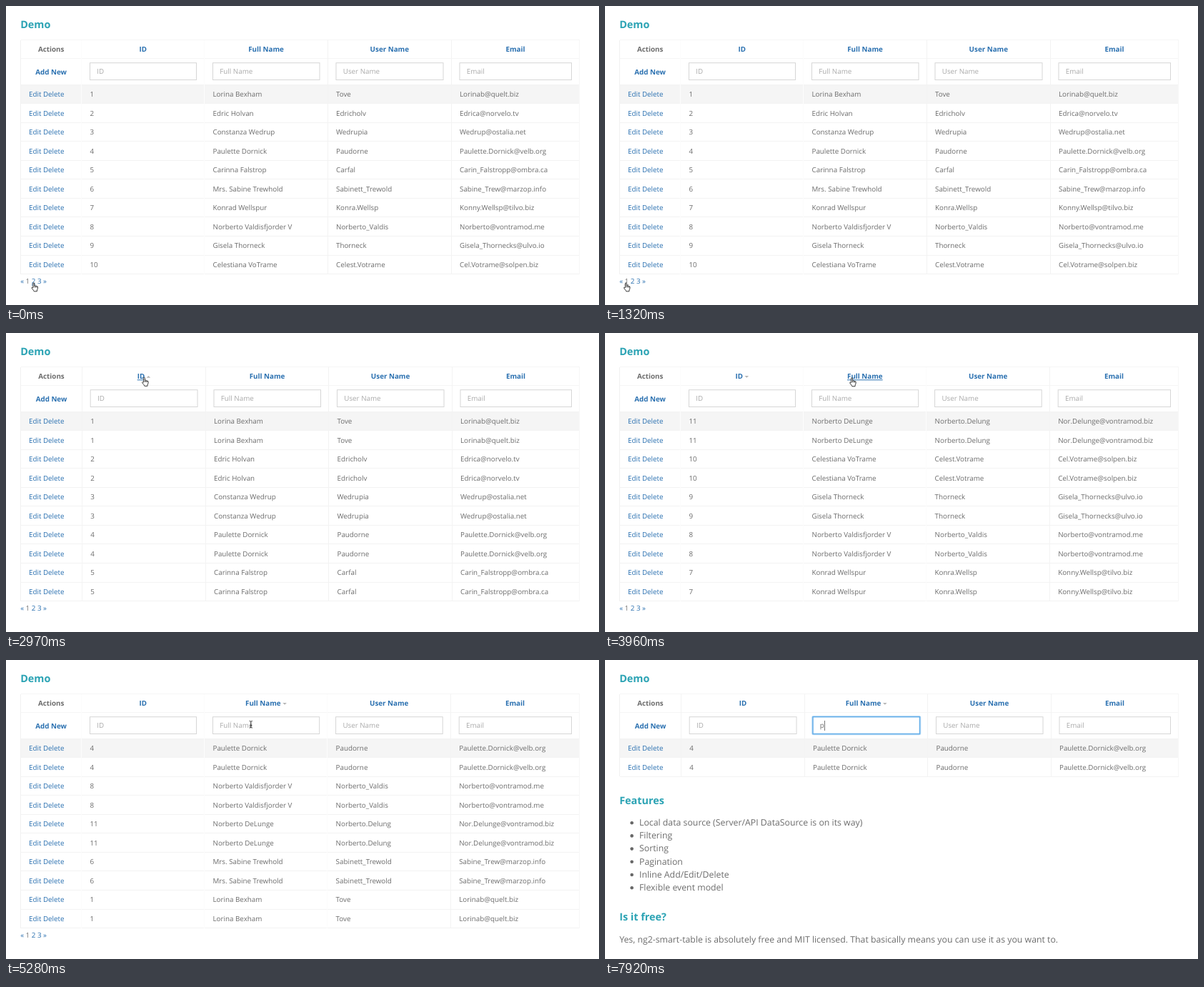
An HTML page for the animation above (8000 ms loop, 830 px wide and 419 px high).

```html
<!DOCTYPE html>
<html lang="en">
<head>
<meta charset="utf-8">
<title>Table demo</title>
<style>
  html, body { margin: 0; height: 100%; overflow: hidden; background: #fff; }
  svg { display: block; width: 830px; height: 419px; }
  text { font: 9.8px "Open Sans", "Noto Sans", sans-serif; fill: #6c6c6c; text-rendering: geometricPrecision; }
  .bold { font-weight: 700; }
  .mid { text-anchor: middle; }
  .link { fill: #2a70b0; }
  .current { fill: #777; }
  .hover { text-decoration: underline; }
  .hint { fill: #aaa; }
  .title { font-size: 14.4px; font-weight: 700; fill: #2ba3b4; }
  .copy { font-size: 12.3px; }
  .line { shape-rendering: crispEdges; }
</style>
</head>
<body>
<svg id="stage" viewBox="0 0 830 419"></svg>
<script>
const people = [
  ["Lorina Bexham", "Tove", "Lorinab@quelt.biz"],
  ["Edric Holvan", "Edricholv", "Edrica@norvelo.tv"],
  ["Constanza Wedrup", "Wedrupia", "Wedrup@ostalia.net"],
  ["Paulette Dornick", "Paudorne", "Paulette.Dornick@velb.org"],
  ["Carinna Falstrop", "Carfal", "Carin_Falstropp@ombra.ca"],
  ["Mrs. Sabine Trewhold", "Sabinett_Trewold", "Sabine_Trew@marzop.info"],
  ["Konrad Wellspur", "Konra.Wellsp", "Konny.Wellsp@tilvo.biz"],
  ["Norberto Valdisfjorder V", "Norberto_Valdis", "Norberto@vontramod.me"],
  ["Gisela Thorneck", "Thorneck", "Gisela_Thornecks@ulvo.io"],
  ["Celestiana VoTrame", "Celest.Votrame", "Cel.Votrame@solpen.biz"],
  ["Norberto DeLunge", "Norberto.Delung", "Nor.Delunge@vontramod.biz"]
];
const headers = ["ID", "Full Name", "User Name", "Email"];
const headerWidths = [10, 49.5];
const twice = ids => ids.flatMap(id => [id, id]);

// Column text positions, and which column dividers stand out
const even = { x: [117.5, 289.5, 462, 635], strong: [2, 3] };
const wideEmail = { x: [117.5, 289.5, 461.6, 634.2], strong: [3] };
const roomy = { x: [118.2, 291, 463.5, 636], strong: [0, 1, 2, 3] };

const firstPage = { ids: [1, 2, 3, 4, 5, 6, 7, 8, 9, 10], layout: even, page: 1 };
const secondPage = { ids: [11, 1, 2, 3, 4, 5, 6, 7, 8, 9], layout: wideEmail, page: 2 };

// Each entry changes part of the state from its time (ms) on
const timeline = [
  [0, { ...firstPage, cursor: ["hand", 35.3, 387.3], hover: "2", sort: null, typed: null, caret: false, filtered: false }],
  [330, secondPage],
  [660, { cursor: ["hand", 26.4, 387.3], hover: "1" }],
  [990, { cursor: ["hand", 25.8, 387.3] }],
  [1320, firstPage],
  [1650, { cursor: ["arrow", 130, 172], hover: "" }],
  [1980, { cursor: ["arrow", 195, 74.5] }],
  [2310, { cursor: ["hand", 190, 61.7], hover: "ID" }],
  [2640, { ids: twice([1, 2, 3, 4, 5]), layout: roomy, sort: [0, "up"] }],
  [3300, { ids: twice([11, 10, 9, 8, 7]), layout: wideEmail, sort: [0, "down"] }],
  [3630, { cursor: ["arrow", 300, 62], hover: "" }],
  [3960, { cursor: ["hand", 342, 62.2], hover: "Full Name" }],
  [4290, { ids: twice([5, 10, 3, 2, 9]), layout: even, sort: [1, "up"] }],
  [5280, { ids: twice([4, 8, 11, 6, 1]), layout: wideEmail, sort: [1, "down"], cursor: ["beam", 342.5, 85], hover: "" }],
  [5610, { typed: "", caret: true }],
  [6270, { caret: false }],
  [6600, { typed: "p", caret: true, cursor: null }],
  [6930, { typed: "pa" }],
  [7260, { ids: [4, 4], layout: roomy, filtered: true }],
  [7920, { typed: "p" }]
];

const LEFT = 20.5, RIGHT = 802.5, TOP = 47.5, BODY = 110.2, ROW = 26.54;

const text = (x, y, content, cls = "") => `<text x="${x}" y="${y}" class="${cls}">${content}</text>`;
const line = (x1, y1, x2, y2, color = "#f1f1f1") => `<path class="line" d="M${x1} ${y1}L${x2} ${y2}" stroke="${color}"/>`;
const box = (x, y, w, h, attrs) => `<rect x="${x}" y="${y}" width="${w}" height="${h}" ${attrs}/>`;

const cursors = {
  hand: `<path d="M2.6 7.4V1.7Q2.6.5 3.5.5T4.4 1.7V4.6Q5.6 4 6.1 5 7.2 4.5 7.7 5.5 9.2 5.2 9.2 6.9 9.2 9 8.2 10.6L8 12.6H3.9Q3.1 10.8 1.9 9.6L.6 7.6Q.9 6.2 2.6 7.4Z
    M4.5 5V7M6.1 5.2V7.1M7.7 5.7V7.2" fill="#fff" stroke="#222" stroke-width=".9" stroke-linejoin="round"/>`,
  arrow: `<path d="M.5.5V10.2L2.7 8.2 4.2 11.8 5.8 11.1 4.3 7.7H7.3Z" fill="#111" stroke="#fff" stroke-width=".8"/>`,
  beam: `<path d="M-1.7.5Q0 .5 .3 1.4 .6.5 2.2.5M.3 1.4V9.2M-1.7 10.1Q0 10.1 .3 9.2 .6 10.1 2.2 10.1M-1 6.8H1.6" fill="none" stroke="#222"/>`
};

function drawGrid({ ids, layout }) {
  const bottom = BODY + ROW * ids.length;
  let out = box(LEFT, BODY, RIGHT - LEFT, ROW, 'fill="#f5f5f5"');
  for (const y of [TOP, 73.5]) out += line(LEFT, y, RIGHT, y, "#f5f5f5");
  for (let i = 0; i <= ids.length; i++) out += line(LEFT, BODY + ROW * i, RIGHT, BODY + ROW * i, "#f3f3f3");
  layout.x.forEach((x, i) => {
    out += line(x - 11.7, TOP, x - 11.7, bottom, layout.strong.includes(i) ? "#f3f3f3" : "#fcfcfc");
  });
  return out + line(LEFT, TOP, LEFT, bottom) + line(RIGHT, TOP, RIGHT, bottom, "#f7f7f7");
}

function drawHeader({ layout, sort, hover }) {
  const actionsX = (LEFT + layout.x[0] - 11.7) / 2;
  let out = text(actionsX, 64.3, "Actions", "bold mid") + text(actionsX, 96, "Add New", "bold mid link");
  headers.forEach((name, i) => {
    const end = i < 3 ? layout.x[i + 1] - 11.7 : RIGHT;
    let center = (layout.x[i] - 11.7 + end) / 2;
    if (sort && sort[0] === i) {
      center -= 4;
      const x = center + headerWidths[i] / 2 + 5.5;
      const [base, tip] = sort[1] === "down" ? [59.9, 62.7] : [62.7, 59.9];
      out += `<path d="M${x - 2.8} ${base}H${x + 2.8}L${x} ${tip}Z" fill="#b5b5b5"/>`;
    }
    out += text(center, 64.3, name, "bold mid link" + (hover === name ? " hover" : ""));
  });
  return out;
}

function drawFilters({ layout, typed, caret }) {
  return headers.map((name, i) => {
    const x = layout.x[i], width = (i < 3 ? layout.x[i + 1] - 23 : 791.5) - x;
    const focused = i === 1 && typed !== null;
    let out = "";
    if (focused) out += box(x, 79.7, width, 23.8, 'rx="1" fill="none" stroke="#66afe9" stroke-opacity=".45" stroke-width="3.6"');
    out += box(x, 79.7, width, 23.8, `fill="#fff" stroke="${focused ? "#66afe9" : "#d6d6d6"}" stroke-width="${focused ? 1.5 : 1}"`);
    out += focused && typed ? text(x + 9.8, 95.4, typed) : text(x + 9.8, 95.4, name, "hint");
    if (focused && caret) {
      const caretX = x + 10.6 + [0, 6.2, 11.2][typed.length];
      out += line(caretX, 85.3, caretX, 98.7, "#777");
    }
    return out;
  }).join("");
}

function drawRows({ ids, layout }) {
  return ids.map((id, row) => {
    const y = 127.05 + ROW * row;
    return text(32, y, "Edit Delete", "link") +
      [id, ...people[id - 1]].map((value, i) => text(layout.x[i], y, value)).join("");
  }).join("");
}

function drawPager({ page, hover }) {
  const numbers = [1, 2, 3].map(n =>
    `<tspan class="${n === page ? "current" : "link"}${hover === String(n) ? " hover" : ""}">${n}</tspan>`);
  return text(20.2, 389.4, `« ${numbers.join(" ")} »`, "link");
}

function drawArticle() {
  const features = ["Local data source (Server/API DataSource is on its way)", "Filtering", "Sorting",
    "Pagination", "Inline Add/Edit/Delete", "Flexible event model"];
  return text(20.2, 202, "Features", "title") +
    features.map((label, i) => {
      const y = 232 + 18.2 * i;
      return `<circle cx="37.6" cy="${y - 3.8}" r="2.3" fill="#666"/>` + text(48, y, label, "copy");
    }).join("") +
    text(20.2, 365, "Is it free?", "title") +
    text(20.2, 396, "Yes, ng2-smart-table is absolutely free and MIT licensed. That basically means you can use it as you want to.", "copy");
}

function drawCursor({ cursor }) {
  if (!cursor) return "";
  const [kind, x, y] = cursor;
  return `<g transform="translate(${x} ${y})">${cursors[kind]}</g>`;
}

const stage = document.getElementById("stage");
let shown = 0;

function frame(now) {
  const passed = timeline.filter(([start]) => start <= now % 8000);
  if (passed.length !== shown) {
    shown = passed.length;
    const state = Object.assign({}, ...passed.map(([, change]) => change));
    stage.innerHTML = text(20.2, 31, "Demo", "title") + drawGrid(state) + drawHeader(state) +
      drawFilters(state) + drawRows(state) +
      (state.filtered ? drawArticle() : drawPager(state)) + drawCursor(state);
  }
  requestAnimationFrame(frame);
}
frame(performance.now());
</script>
</body>
</html>
```
